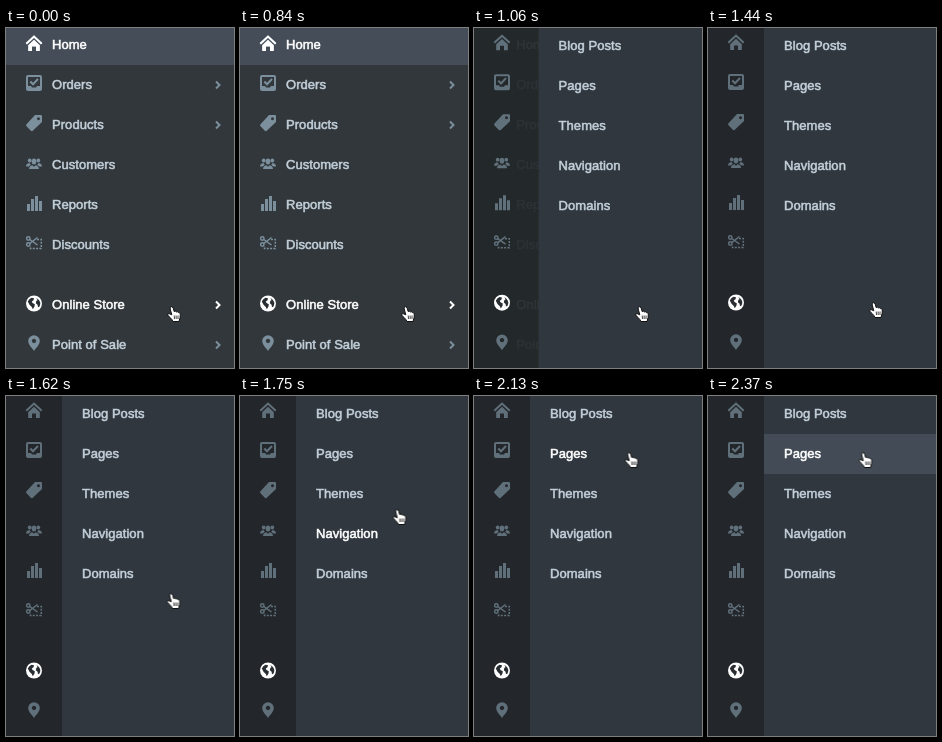
Write an HTML page that moves like this. It is 228x340 px and loops after 3.87 s.

```html
<!DOCTYPE html>
<html lang="en">
<head>
<meta charset="utf-8">
<title>Sliding sidebar menu</title>
<style>
  /* --p: how far the submenu has slid in, 0 to 1 */
  @property --p { syntax: "<number>"; inherits: true; initial-value: 0; }

  html, body { margin: 0; width: 100%; height: 100%; overflow: hidden; background: #31373b; }
  svg { display: block; width: 228px; height: 340px; animation: slide 3870ms step-end infinite; }
  text {
    font: 13px "Liberation Sans", Arial, sans-serif;
    letter-spacing: .05px;
    fill: currentColor; stroke: currentColor; stroke-width: .55px;
  }

  .labels, .panel { color: #c3d0da; }
  .labels .active, .active { color: #fff; }
  .shade { opacity: var(--p); }
  .labels { opacity: calc(1 - var(--p)); transform: translateX(calc(var(--p) * -4px)); }
  .home { opacity: calc(1 - var(--p) * 1.5); }
  .icons { transform: translateY(calc(max(0, var(--p) * 3 - 2) * -1px)); }
  .muted { color: #7b8f9d; opacity: calc(1 - var(--p) * .3); }
  .arrows { color: #7b8f9d; fill: none; stroke: currentColor; stroke-width: 2; }
  .fill { fill: currentColor; }
  .line { fill: none; stroke: currentColor; }
  .panel { transform: translateX(calc(228px - var(--p) * 172px)); }

  .hover { opacity: 0; animation: row 3870ms step-end infinite; }
  .pages { animation: pages 3870ms step-end infinite; }
  .themes { animation: themes 3870ms step-end infinite; }
  .nav { animation: nav 3870ms step-end infinite; }
  .domains { animation: domains 3870ms step-end infinite; }
  .cursor { animation: move 3870ms steps(3) infinite; }

  @keyframes slide {
    0% { --p: 0; }
    23.773% { --p: .25; }
    24.548% { --p: .53; }
    25.065% { --p: .692; }
    25.84% { --p: .82; }
    26.615% { --p: .91; }
    27.132% { --p: .95; }
    27.907% { --p: .985; }
    28.682%, 100% { --p: 1; }
  }
  @keyframes domains { 42.119% { color: #fff; } 43.669% { color: #c3d0da; } }
  @keyframes nav { 43.669% { color: #fff; } 45.736% { color: #c3d0da; } }
  @keyframes themes { 45.736% { color: #fff; } 49.483% { color: #c3d0da; } }
  @keyframes pages { 49.483%, 100% { color: #fff; } }
  @keyframes row { 61.24%, 100% { opacity: 1; } }
  @keyframes move {
    0% { transform: translate(161px, 278px); animation-timing-function: step-end; }
    37.209% { transform: translate(161px, 274px); }
    39.276% { transform: translate(162.5px, 244px); }
    41.344% { transform: translate(160.5px, 197px); }
    43.411% { transform: translate(156px, 146px); }
    45.22% { transform: translate(152.5px, 113px); animation-timing-function: steps(4); }
    47.804% { transform: translate(151px, 86px); }
    50.129% { transform: translate(150.5px, 70px); animation-timing-function: step-end; }
    50.904% { transform: translate(150.5px, 64px); animation-timing-function: step-end; }
    52.196% { transform: translate(150.5px, 60px); animation-timing-function: step-end; }
    53.488% { transform: translate(150.5px, 58px); animation-timing-function: step-end; }
    55.039%, 100% { transform: translate(150.5px, 56px); }
  }
</style>
</head>
<body>
<svg viewBox="0 0 228 340">
  <defs>
    <g id="house">
      <path class="line" stroke-width="2" d="M20.3 15.7 28 8.6 35.7 15.7"/>
      <path class="fill" d="M28 11.8 33.8 17.2V23H30V18.5H26V23H22.2V17.2Z"/>
    </g>
    <path id="chevron" d="M210 -3.5 213.5 0 210 3.5"/>
  </defs>

  <rect width="228" height="340" fill="#31373b"/>
  <rect class="home" width="228" height="37" fill="#454e58"/>
  <rect class="shade" width="228" height="340" fill="#23272b"/>

  <g class="labels">
    <text class="active" x="46" y="21">Home</text>
    <text x="46" y="61">Orders</text>
    <text x="46" y="101">Products</text>
    <text x="46" y="141">Customers</text>
    <text x="46" y="181">Reports</text>
    <text x="46" y="221">Discounts</text>
    <text class="active" x="46" y="281">Online Store</text>
    <text x="46" y="321">Point of Sale</text>
  </g>

  <g class="icons">
    <g class="muted">
      <use href="#house"/>
      <!-- orders -->
      <rect class="line" x="21" y="48" width="14" height="14" rx="1" stroke-width="2"/>
      <path class="line" d="M24.3 53.5 27 56.3 32 51" stroke-width="2"/>
      <path class="fill" d="M21 58H25L26 59.5H30L31 58H35V62H21Z"/>
      <!-- products -->
      <path class="fill" fill-rule="evenodd" d="M29 87H35Q36 87 36 88V94L26.5 103Q25.5 103.5 24.8 102.8L20.3 98Q19.7 97 20.5 96.3ZM32.5 89.2a1.5 1.5 0 1 0 .01 0Z"/>
      <!-- customers -->
      <g class="fill">
        <circle cx="23.7" cy="132.5" r="1.9"/>
        <circle cx="32.3" cy="132.5" r="1.9"/>
        <path d="M20 138.5Q20 135.8 23.3 135L24.8 136.8 22.8 138.5ZM36 138.5Q36 135.8 32.7 135L31.2 136.8 33.2 138.5Z"/>
        <ellipse cx="28" cy="133.6" rx="2.3" ry="3"/>
        <path d="M23 141Q23 138.2 26.3 137.3L28 138.8 29.7 137.3Q33 138.2 33 141Z"/>
      </g>
      <!-- reports -->
      <path class="fill" d="M21 176h3v7h-3ZM25 171h3v12h-3ZM29 168h3v15h-3ZM33 173h3v10h-3Z"/>
      <!-- discounts -->
      <g class="line" stroke-width="1.5">
        <circle cx="22.3" cy="210.5" r="1.7"/>
        <circle cx="22.3" cy="216.5" r="1.7"/>
        <path d="M23.8 211.5 31.5 217M23.8 215.5 31.5 209.5"/>
        <path d="M31 211.5H35.3V220.5H24.5V218" stroke-dasharray="2 1.3"/>
      </g>
      <!-- point of sale -->
      <path class="fill" fill-rule="evenodd" d="M28 323C25.5 319.5 22.2 316.5 22.2 313.1A5.8 5.8 0 0 1 33.8 313.1C33.8 316.5 30.5 319.5 28 323ZM28 310.8a2.2 2.2 0 1 0 .01 0Z"/>
    </g>
    <use class="home active" href="#house"/>
    <!-- online store -->
    <circle cx="28" cy="275.5" r="8" fill="#fff"/>
    <path fill="#292e33" d="M21.8 273.5Q23 270.8 25.5 269.8L28 270.3 27.5 272.3 25.8 273.5 26.5 275 28.8 276.3 28.5 278.5 26.8 281.3 25.8 279 23.5 276.8ZM30.3 270Q33.8 271.5 34.4 275.5L33.6 278.5 32 279.3 31.6 276.8 29.8 275.3 30.3 273 31.6 272Z"/>
  </g>

  <g class="arrows">
    <use href="#chevron" y="57"/>
    <use href="#chevron" y="97"/>
    <use class="active" href="#chevron" y="277"/>
    <use href="#chevron" y="317"/>
  </g>

  <g class="panel">
    <rect width="172" height="340" fill="#31373f"/>
    <rect class="hover" y="38" width="172" height="40" fill="#434c56"/>
    <text x="20" y="22">Blog Posts</text>
    <text class="pages" x="20" y="62">Pages</text>
    <text class="themes" x="20" y="102">Themes</text>
    <text class="nav" x="20" y="142">Navigation</text>
    <text class="domains" x="20" y="182">Domains</text>
  </g>

  <g class="cursor" stroke="#111">
    <path fill="#fff" stroke-linejoin="round" d="M4.8 8.8 3.2 3Q2.7 1 4.2.7 5.7.5 6.2 2.2L7.2 5.6Q8.8 4.6 9.6 6 11 5.2 11.7 6.7 13 6.2 13.3 8 13.6 11 12 15.5H6Q5.2 13.3 2.7 11.2.3 9 .7 8 1.8 6.8 3.3 8.3Z"/>
    <path fill="none" stroke-width=".8" d="M7.2 9.5l.3 3.5M9.1 9.5l.1 3.5M11 9.5v3.5"/>
  </g>
</svg>
</body>
</html>
```
